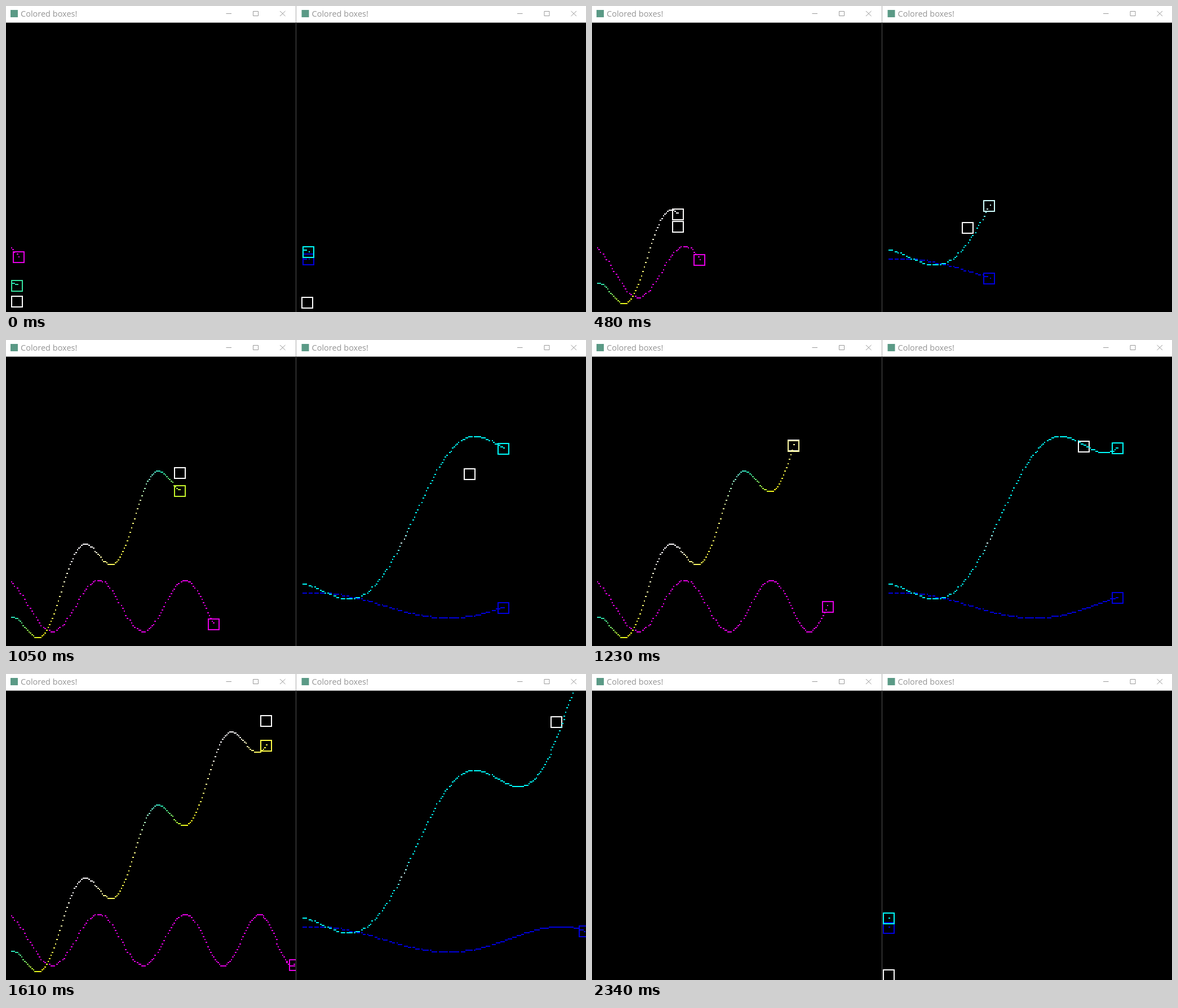
Animation, 1029 px wide and 544 px high, one loop 2.37 s. Source, as an HTML page with a canvas:

```html
<!DOCTYPE html>
<html lang="en">
<head>
<meta charset="utf-8">
<title>Colored boxes!</title>
<style>
html, body { margin: 0; width: 100%; height: 100%; overflow: hidden; background: #000; }
canvas { display: block; }
</style>
</head>
<body>
<canvas id="stage" width="1029" height="544"></canvas>
<script>
const ctx = document.getElementById('stage').getContext('2d');
const { abs, sin, cos, min, max, round, floor, PI } = Math;
const LOOP = 2370, RESTART = 2340, UNIT = 2.6, START = 8.6;

// Steps travelled at given times (ms)
const progress = [[0, 4], [480, 55], [780, 85], [1050, 115], [1380, 150], [1850, 199]];

const same = s => s;
const lead = s => s + 61 * sin(0.0048 * (s - 10));
const wave = s => cos(0.0484 * (s - 65));

// Teal on every second crest, yellow in the dips, white on the other crests
function lime(s) {
  const fromTeal = abs((s + 116) % 260 - 130);
  const r = min(255, 30 + 5 * fromTeal);
  const b = 150 - 100 * wave(s) + 50 * cos(2 * PI * (s - 150) / 260);
  return `rgb(${r}, ${220 + r / 8}, ${min(255, max(0, b))})`;
}
const cyan = s => `rgb(${max(0, 230 - 20 * abs(s - 150))}, 255, 255)`;
const magenta = () => '#e600e6';
const blue = () => '#0000e0';

const left = {
  x: 0, width: 514, bar: 0, first: 0, shift: 0, row: 492.6,
  guide: s => 544 - s,
  movers: [
    { x: lead, y: s => 472.7 + 45.5 * wave(s), color: magenta },
    { x: same, y: s => 543.5 - s + 46 * wave(s), color: lime }
  ]
};
const right = {
  x: 515, width: 514, bar: 516.5, first: 1, shift: -0.5, row: 494,
  guide: s => 545.5 - s,
  movers: [
    { x: lead, y: s => 472 - 22.8 * cos(0.0163 * (s - 25)), color: blue },
    { x: lead, y: s => 482 - s + 66 * sin(0.02417 * (s - 296)), color: cyan }
  ]
};

const snap = (v, base) => base + round((v - base) / UNIT) * UNIT;

function box(x, y, color) {
  ctx.strokeStyle = color;
  ctx.lineWidth = 2;
  ctx.strokeRect(round(x) - 9, round(y) - 9, 19, 19);
}

function dot(x, y, color) {
  const x0 = round(x);
  ctx.fillStyle = color;
  ctx.fillRect(x0, round(y) - 1, round(x + UNIT) - x0, 2);
}

function drawScene(win, n) {
  const dist = i => START + UNIT * i + win.shift;
  const s = dist(n);
  ctx.save();
  ctx.beginPath();
  ctx.rect(win.x, 30, win.width, 514);
  ctx.clip();
  ctx.translate(win.x, 0);
  box(s, win.guide(s), '#fff');
  for (const m of win.movers) {
    for (let i = win.first; i <= n; i++) {
      const d = dist(i);
      dot(snap(m.x(d), START), snap(m.y(d), win.row), m.color(d));
    }
    box(m.x(s), m.y(s) + 1, m.color(s));
  }
  ctx.restore();
}

function drawBar(x) {
  ctx.save();
  ctx.translate(x, 0);
  ctx.fillStyle = '#5b9a86';
  ctx.fillRect(8, 7, 13, 13);
  ctx.fillStyle = '#959595';
  ctx.font = '14.5px "Open Sans", "Noto Sans", sans-serif';
  ctx.fillText('Colored boxes!', 26, 19);
  ctx.strokeStyle = '#999';
  ctx.lineWidth = 1;
  ctx.beginPath();
  ctx.moveTo(390.5, 13.5);
  ctx.lineTo(400, 13.5);
  ctx.rect(438.5, 9.5, 9, 8);
  ctx.moveTo(486, 9);
  ctx.lineTo(495.5, 18);
  ctx.moveTo(495.5, 9);
  ctx.lineTo(486, 18);
  ctx.stroke();
  ctx.restore();
}

function stepsAt(t) {
  // 30 ms ticks, with one late tick at 1610
  const tick = t < 1610 ? min(1560, floor(t / 30) * 30)
                        : min(1850, 20 + floor((t - 20) / 30) * 30);
  const i = max(1, progress.findIndex(p => p[0] >= tick));
  const [t0, n0] = progress[i - 1], [t1, n1] = progress[i];
  return round(n0 + (n1 - n0) * (tick - t0) / (t1 - t0));
}

function rect(color, x, y, w, h) {
  ctx.fillStyle = color;
  ctx.fillRect(x, y, w, h);
}

function draw(t) {
  rect('#000', 0, 0, 1029, 544);
  rect('#fff', 0, 0, 1029, 29);
  rect('#999', 0, 29, 1029, 1);
  rect('#aaa', 514, 0, 1, 29);
  rect('#555', 514, 29, 1, 515);
  // The right window restarts one tick before the left one
  const restarted = t >= RESTART;
  if (!restarted) drawScene(left, stepsAt(t));
  drawScene(right, restarted ? right.first : stepsAt(t));
  drawBar(left.bar);
  drawBar(right.bar);
}

const begin = performance.now();
function loop() {
  draw((performance.now() - begin) % LOOP);
  requestAnimationFrame(loop);
}
loop();
</script>
</body>
</html>
```
